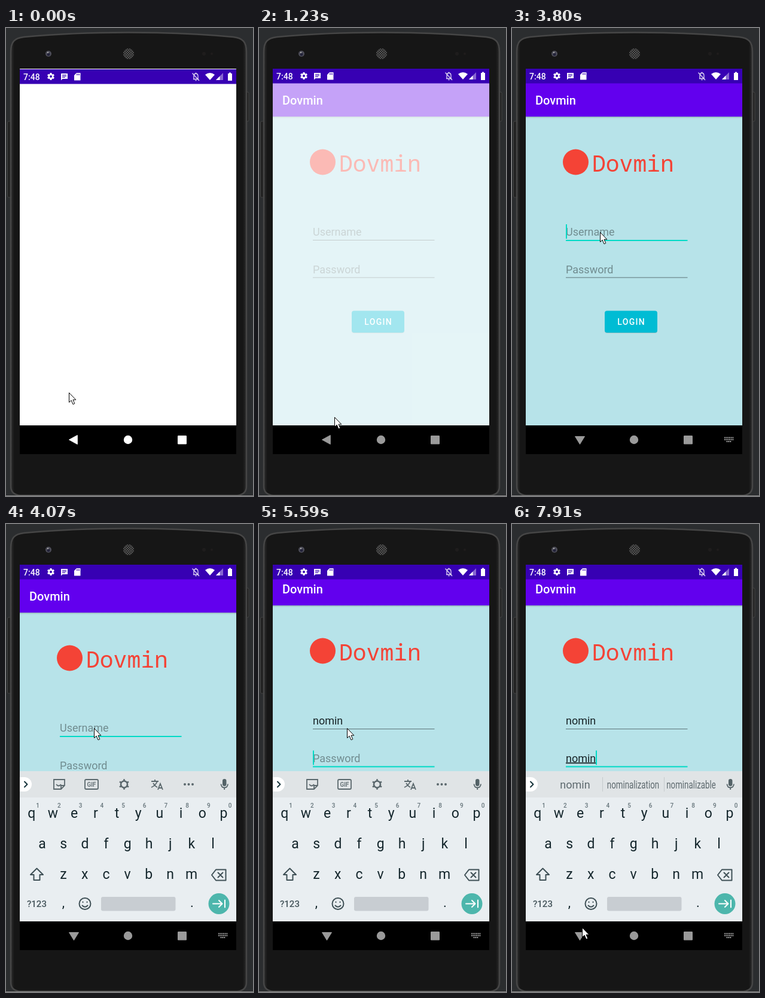
Animation of 413 by 782 pixels, one loop 8 s. Source, as an HTML page:

```html
<!DOCTYPE html>
<html lang="en">
<head>
<meta charset="utf-8">
<title>Login screen</title>
<style>
  html, body { margin: 0; width: 100%; height: 100%; overflow: hidden; background: #2b2d2f; }
  svg { display: block; width: 413px; height: 782px; font-family: Roboto, sans-serif; }
  .medium { font-weight: 500; }
  .mid { text-anchor: middle; }
  .logo { font-family: 'Noto Sans Mono', 'DejaVu Sans Mono', monospace; }
  .line { fill: none; stroke-width: 2; stroke-linecap: round; stroke-linejoin: round; }
</style>
</head>
<body>
<svg viewBox="0 0 413 782">
  <defs>
    <clipPath id="screen"><rect x="23" y="68" width="362" height="596"/></clipPath>
    <pattern id="mesh" width="4" height="4" patternUnits="userSpaceOnUse">
      <circle cx="1" cy="1" r="1" fill="#666"/><circle cx="3" cy="3" r="1" fill="#666"/>
    </pattern>
    <linearGradient id="body">
      <stop offset="0" stop-color="#303030"/><stop offset=".015" stop-color="#161616"/>
      <stop offset=".985" stop-color="#161616"/><stop offset="1" stop-color="#2c2c2c"/>
    </linearGradient>
    <linearGradient id="shade" x2="0" y2="1">
      <stop offset="0" stop-opacity=".22"/><stop offset="1" stop-opacity="0"/>
    </linearGradient>
    <path id="gear" d="M0-6V6M-5.2-3L5.2 3M-5.2 3L5.2-3"/>
  </defs>

  <rect width="413" height="782" fill="#2b2d2f"/>
  <rect x="2.500" y="156" width="6" height="127" rx="2" fill="#222" stroke="#444"/>
  <rect x="400" y="107" width="6" height="49" rx="2" fill="#222" stroke="#444"/>
  <path d="M8 40C8 23 14 17 30 15Q110 7.500 205 7.500T380 15C396 17 402 23 402 40V766Q402 779 387 781H23Q8 779 8 766Z" fill="url(#body)" stroke="#464646" stroke-width="2.500"/>
  <rect y="781" width="413" height="1" fill="#8a8a8a"/>
  <circle cx="71" cy="43" r="5" fill="#4d4d58"/><circle cx="71" cy="44" r="2.500" fill="#23233a"/><circle cx="70" cy="41" r="1.200" fill="#aaa"/>
  <circle cx="205" cy="43" r="9.500" fill="#222"/><circle cx="205" cy="43" r="9" fill="url(#mesh)"/>
  <circle cx="331" cy="43" r="3" fill="#1f1d1d"/><circle cx="344" cy="43" r="2" fill="#1f1d1d"/>

  <rect x="23" y="68" width="362" height="644"/>
  <g clip-path="url(#screen)">
    <rect x="23" y="68" width="362" height="596" fill="#fff"/>
    <g id="page">
      <rect x="23" y="92" width="362" height="600" fill="#b7e3e9"/>
      <rect x="23" y="148" width="362" height="3" fill="url(#shade)"/>
      <rect x="23" y="80" width="362" height="68" fill="#6200ee"/>
      <text x="39" y="128" class="medium" font-size="20" fill="#fff">Dovmin</text>
      <circle cx="106.500" cy="224" r="21.500" fill="#f44336"/>
      <text x="134" y="239.500" class="logo" font-size="38" fill="#f44336">Dovmin</text>
      <g id="fields"></g>
      <rect x="155" y="474" width="88" height="36" rx="4" opacity=".16"/>
      <rect x="155" y="472.500" width="88" height="36.500" rx="4" fill="#00bcd4"/>
      <text x="199.600" y="496" class="medium mid" font-size="14" letter-spacing="1.250" fill="#fff">LOGIN</text>
    </g>
    <g id="status">
      <rect x="23" y="68" width="362" height="24.500" fill="#3700b3"/>
      <g fill="#fff">
        <text x="29" y="85.500" class="medium" font-size="14">7:48</text>
        <g transform="translate(75 80)">
          <use href="#gear" stroke="#fff" stroke-width="3"/><circle r="4.500"/><circle r="2" fill="#3700b3"/>
        </g>
        <path d="M92 75H103V84H94.500L92 86.500Z"/>
        <path d="M94 77.500H101M94 79.500H101M94 81.500H99" stroke="#3700b3"/>
        <path d="M118 74H124.500V86.500H114V78Z"/>
        <path d="M118.500 75.500V78M120.500 75.500V78M122.500 75.500V78" stroke="#3700b3"/>
        <path d="M333 77Q341 71 349 77L341 86Z"/>
        <path d="M363 74V86H351Z" opacity=".4"/><path d="M357.500 79.500V86H351Z"/>
        <path d="M373 73.500H376V75H378V87H371V75H373Z"/>
      </g>
      <path d="M313 84.500H322M314 84V79.500Q314 75.500 317.500 75Q321 75.500 321 79.500V84M317.500 73.500V75M316.500 86.500H318.500M311.500 74.500L323 87" fill="none" stroke="#e0d8f2" stroke-width="1.300"/>
    </g>
    <g id="keyboard">
      <rect x="23" y="413" width="362" height="251" fill="#e9eef1"/>
      <rect x="23" y="413" width="362" height="44" fill="#e0e4e6"/>
      <path d="M23 423H31A12 12 0 0 1 31 447H23Z" fill="#fff"/>
      <path d="M31 430.500L35.500 435L31 439.500" class="line" stroke="#17343b"/>
      <g fill="#536267">
        <rect x="362" y="426" width="6.500" height="12" rx="3.200"/>
        <path d="M359.500 434.500Q360 440.500 365.200 440.500T371 434.500M365.200 441V444" fill="none" stroke="#536267" stroke-width="1.800"/>
      </g>
      <g id="tools" fill="none" stroke="#5b686d" stroke-width="1.800">
        <path d="M80 427H98V437L92 443H80ZM98 437H92V443M84 435Q88 440 92 435"/>
        <rect x="132" y="427" width="22" height="16" rx="2"/>
        <text x="143" y="439" class="medium mid" font-size="10" fill="#5b686d" stroke="none">GIF</text>
        <g transform="translate(197.500 435) scale(1.450)"><use href="#gear"/><circle r="3.800" fill="#e0e4e6"/></g>
        <path d="M243 430H255M249 427V430M253 430Q250 437 243 440M246 433Q249 438 253 440M254 444L258 434L262 444M255.500 441H260.500"/>
        <path d="M299 435H316" stroke-width="4" stroke-linecap="round" stroke-dasharray="0 6.500"/>
      </g>
      <g id="words" fill="#5d696e" font-size="18">
        <path d="M151.500 423V447M254.500 423V447" stroke="#c4cacd"/>
      </g>
      <g id="keys" fill="#14262c"></g>
      <g stroke="#3f5056" class="line">
        <path d="M51.500 575.500L62 586H56.500V595H46.500V586H41Z"/>
        <path d="M351 577.500H367.500V595.500H351L344 586.500ZM354.500 582.500L362.500 590.500M362.500 582.500L354.500 590.500"/>
        <circle cx="132" cy="634.500" r="9.500"/>
        <path d="M127.500 637.500Q132 642 136.500 637.500M128.500 631.500V632M135.500 631.500V632"/>
      </g>
      <rect x="159" y="623" width="124.500" height="23.500" rx="3" fill="#c8cdd2"/>
      <circle cx="356" cy="634.500" r="17.500" fill="#4db6ac"/>
      <path d="M346 634.500H361M356 629L361.500 634.500L356 640M366 628.500V640.500" class="line" stroke="#fff"/>
    </g>
  </g>

  <g id="nav">
    <path id="back" stroke-width="1" stroke-linejoin="round"/>
    <circle cx="204" cy="688" r="7.200"/>
    <rect x="287" y="681" width="15" height="14.500" rx="1.200"/>
    <path id="ime" d="M355 684.500H370.500M355 687.700H370.500M358.500 691H367" fill="none" stroke="#a0a0a0" stroke-width="2" stroke-dasharray="1.900 .8"/>
  </g>
  <path id="pointer" d="M.5 .5V16.500L4.200 13.200L7 19.800L9.800 18.600L7 12.200H11.800Z" fill="#fff" stroke="#000"/>
</svg>
<script>
const LOOP = 8000;
const TEAL = '#00dac6';
const $ = id => document.getElementById(id);

function add(parent, tag, attrs, text = '') {
  const node = document.createElementNS('http://www.w3.org/2000/svg', tag);
  for (const name in attrs) node.setAttribute(name, attrs[name]);
  node.textContent = text;
  parent.append(node);
  return node;
}

const show = (node, on) => node.setAttribute('visibility', on ? 'inherit' : 'hidden');
const shift = (node, x, y) => node.setAttribute('transform', `translate(${x} ${y})`);

// Value of the last [time, ...value] entry already reached.
const step = (track, t) => track.findLast(entry => entry[0] <= t).slice(1);

function makeField(y, hint) {
  const root = add($('fields'), 'g', { transform: `translate(90 ${y})` });
  return {
    hint: add(root, 'text', { y: 20, 'font-size': 18, opacity: .38 }, hint),
    text: add(root, 'text', { y: 20, 'font-size': 18, fill: '#182427' }),
    line: add(root, 'rect', { y: 27, width: 203.5 }),
    caret: add(root, 'rect', { y: 1, width: 2, height: 24, fill: TEAL }),
  };
}

function drawField(field, value, focused, caretOn) {
  field.text.textContent = value;
  field.text.setAttribute('text-decoration', focused ? 'underline' : 'none');
  show(field.hint, !value);
  field.line.setAttribute('height', focused ? 2 : 1);
  field.line.setAttribute('fill', focused ? TEAL : '#5d7479');
  show(field.caret, focused && caretOn);
  field.caret.setAttribute('x', value ? Math.round(field.text.getComputedTextLength()) : 0);
}

const userField = makeField(327, 'Username');
const passField = makeField(389.5, 'Password');

const label = (x, y, size, text, more) =>
  add($('keys'), 'text', { x, y, 'font-size': size, class: 'mid', ...more }, text);
['qwertyuiop', 'asdfghjkl', 'zxcvbnm'].forEach((row, r) => {
  [...row].forEach((key, i) => {
    const x = [42.7, 60.5, 96][r] + i * 35.7;
    label(x, 490.5 + r * 51, 23, key);
    if (r === 0) label(x + 10.5, 474, 10, (i + 1) % 10, { fill: '#66757b', class: 'mid medium' });
  });
});
label(51.5, 640, 15, '?123', { class: 'mid medium', fill: '#45555b' });
label(96, 640, 22, ',');
label(311, 640, 22, '.');

const wordNodes = [105.5, 202.5, 299.5].map(x => {
  const slot = add($('words'), 'g', { transform: `translate(${x} 442)` });
  return add(slot, 'text', { class: 'mid' });
});

const LOGIN = 'nomin';
const suggestions = [
  ['', '', ''],
  ['n', 'no', 'not'],
  ['no', 'not', 'now'],
  ['nom', 'nomad', 'nomin'],
  ['nomi', 'nomad', 'nomin'],
  ['nomin', 'nominalization', 'nominalizable'],
];

const pointerTrack = [
  [0, 105, 609], [120, 107, 617], [240, 111, 626], [390, 123, 671], [510, 123, 629],
  [660, 125, 636], [810, 125, 638], [960, 125, 642], [1090, 126, 650], [2250, 129, 647],
  [2370, 190, 580], [2490, 302, 450], [2610, 217, 311], [2730, 165, 340], [2850, 146, 350],
  [3130, 146, 347], [3280, 147, 341], [7270, 225, 440], [7400, 269, 551], [7540, 256, 595],
  [7660, 205, 642], [7790, 140, 670], [7910, 117, 674],
];
const userTyped = [[0, 0], [4690, 1], [4840, 2], [4960, 3], [5080, 4], [5200, 5]];
const passTyped = [[0, 0], [5740, 1], [5890, 2], [6010, 4], [6560, 5]];
const caretTrack = [[0, true], [3930, false], [4440, true], [7120, false], [7660, true]];
const statusTrack = [[0, 1], [120, .5], [240, 0]];
const pageTrack = [[0, 0], [1230, .36], [1350, 1]];
const panTrack = [[0, 0], [5320, -6], [5470, -12]];
const keyboardTrack = [[0, 251], [3930, 60], [4070, 0]];

function render(t) {
  shift($('pointer'), ...step(pointerTrack, t));
  shift($('status'), 0, step(statusTrack, t)[0]);
  $('page').setAttribute('opacity', step(pageTrack, t)[0]);
  shift($('page'), 0, step(panTrack, t)[0]);
  shift($('keyboard'), 0, step(keyboardTrack, t)[0]);

  const [userCount] = step(userTyped, t);
  const [passCount] = step(passTyped, t);
  const [caretOn] = step(caretTrack, t);
  const onPassword = t >= 5320;
  drawField(userField, LOGIN.slice(0, userCount), t >= 3410 && !onPassword, caretOn);
  drawField(passField, LOGIN.slice(0, passCount), onPassword, caretOn);

  const count = onPassword ? passCount : userCount;
  show($('tools'), count === 0);
  show($('words'), count > 0);
  wordNodes.forEach((node, i) => {
    const word = suggestions[count][i];
    node.textContent = word;
    // The suggestion strip condenses long words.
    node.setAttribute('transform', `scale(${word.length > 10 ? .74 : 1} 1)`);
  });

  const imeOpen = t >= 3800;
  const color = t < 660 ? '#fff' : '#9a9a9a';
  $('nav').setAttribute('fill', color);
  $('back').setAttribute('stroke', color);
  $('back').setAttribute('d', imeOpen ? 'M105.500 682.500H121.500L113.500 695.500Z' : 'M105.500 688L119.300 680.500V695.500Z');
  show($('ime'), imeOpen);
}

const start = performance.now();
function tick() {
  render((performance.now() - start) % LOOP);
  requestAnimationFrame(tick);
}
tick();
</script>
</body>
</html>
```
